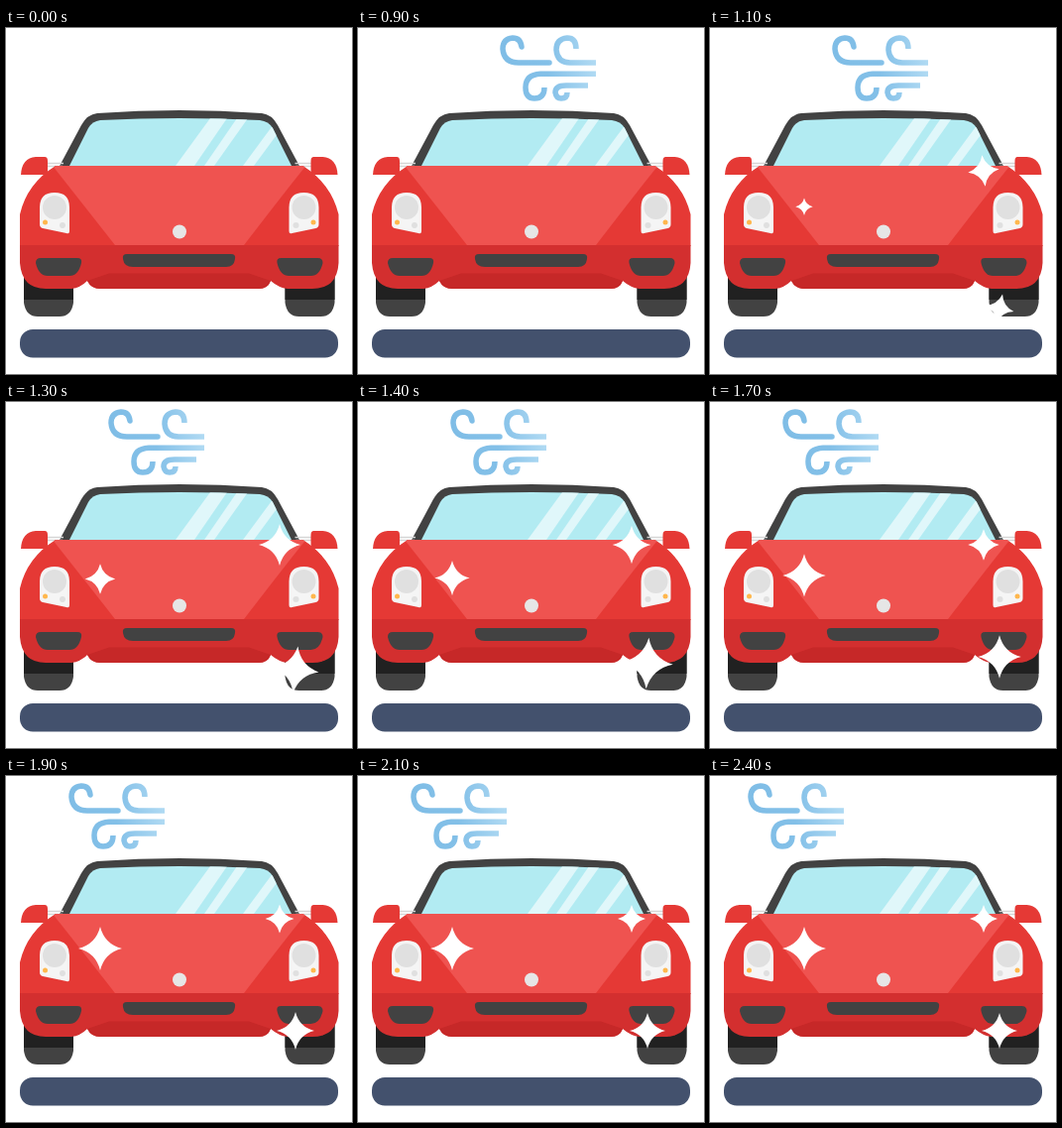
Recreate the animation shown at these times as an HTML page. Size 349x349 px, loop 3.6 s.

```html
<!DOCTYPE html>
<html lang="en">
<head>
<meta charset="utf-8">
<title>Shiny car</title>
<style>
html, body { margin: 0; width: 100%; height: 100%; overflow: hidden; background: #fff; }
svg { display: block; width: 100vw; height: 100vh; }
</style>
</head>
<body>
<svg viewBox="0 0 349 349">
  <defs>
    <linearGradient id="breeze" gradientUnits="userSpaceOnUse" x1="38" y1="0" x2="135" y2="0">
      <stop offset="0" stop-color="#7fbde6"/>
      <stop offset=".5" stop-color="#83c0e8"/>
      <stop offset="1" stop-color="#b0daf3"/>
    </linearGradient>
    <clipPath id="glass">
      <path d="M64 139L83 101Q87 94 95 93Q175 89 256 93Q265 94 269 101L288 139Z"/>
    </clipPath>
    <clipPath id="body">
      <path d="M50 139H299.5Q328 157 335.5 188V237Q334 263 309 263H284Q275 262 267 255Q264 263 255 263H95Q86 263 82 255Q75 262 66 263H40Q16 263 14 237V188Q21 157 50 139Z"/>
    </clipPath>
    <g id="wheel">
      <path d="M18 240H68V277Q66 291 54 291H32Q20 291 18 277Z" fill="#424242"/>
      <path d="M18 240H68V274H18Z" fill="#212121"/>
    </g>
    <g id="mirror">
      <path d="M39 136.5H58M39 139.5H57" stroke="#d5d5d5" stroke-width="1.5"/>
      <path d="M15 148Q16 131 30 130H39Q42 130 42 134V144Q42 148 38 148Z" fill="#e53935"/>
    </g>
    <g id="lamps">
      <path d="M34 181Q34 166 49 166Q64 166 64 181V205Q64 208 61 207L37 202Q34 201 34 198Z" fill="#f5f5f5"/>
      <circle cx="49" cy="181" r="12" fill="#e0e0e0"/>
      <circle cx="39.5" cy="196" r="2.5" fill="#ffb74d"/>
      <circle cx="57" cy="199" r="3" fill="#e0e0e0"/>
      <path d="M35 232H72Q77 232 76 237Q73 250 64 250H42Q33 250 30 237Q30 232 35 232Z" fill="#424242"/>
    </g>
  </defs>

  <rect x="14" y="304" width="321" height="28.5" rx="13" fill="#43516d"/>
  <use href="#wheel"/>
  <use href="#wheel" transform="translate(349.5) scale(-1 1)"/>

  <path d="M53 141L76 98Q82 87 92 86Q175 80 258 86Q268 87 274 98L297 141Z" fill="#424242"/>
  <g clip-path="url(#glass)">
    <path d="M60 88H292V140H60Z" fill="#b2ebf2"/>
    <path d="M171 139H190L223 91H206ZM200 139H210L244 91H233ZM239 139H250L278 101L270 97Z" fill="#e0f7fa"/>
  </g>
  <use href="#mirror"/>
  <use href="#mirror" transform="translate(349.5) scale(-1 1)"/>

  <g clip-path="url(#body)">
    <path d="M14 139H336V220H14Z" fill="#e53935"/>
    <path d="M14 219H336V264H14Z" fill="#d32f2f"/>
    <path d="M82 255L104 247.5H245L267 255V264H82Z" fill="#c62828"/>
    <path d="M47 139H302.5Q287 158 240 219H110Q62 158 47 139Z" fill="#ef5350"/>
  </g>
  <path d="M122 228H227Q232 228 231 233Q230 241 222 241H128Q119 241 118 233Q117 228 122 228Z" fill="#424242"/>
  <circle cx="175" cy="205.5" r="7" fill="#e6e6e6"/>
  <use href="#lamps"/>
  <use href="#lamps" transform="translate(349.5) scale(-1 1)"/>

  <g id="wind" fill="none" stroke="url(#breeze)" stroke-width="5.5">
    <path stroke-linecap="round" d="M60 19Q59 10 51 10Q41 11 41 21Q42 35 57 35H88"/>
    <path d="M115 21Q115 10 106 10Q95 11 95 22Q96 35 109 35H135"/>
    <path d="M135 46.2H79Q64 47 64 60Q64 71 73 71Q83 71 83 60"/>
    <path d="M127 58H105Q94 58 94 65Q95 71 100 71Q106 71 106 65"/>
  </g>
  <g id="stars" fill="#fff"></g>
</svg>
<script>
const LOOP = 3600, STEP = 100, START = 900, SETTLED = 12;
const wind = document.getElementById("wind");
const starGroup = document.getElementById("stars");

// Each star grows until its peak step, then shrinks from size + swell to size.
const stars = [
  { x: 95, y: 174, size: 22, swell: 0, peak: 9, rise: 8, turn: 0 },
  { x: 276, y: 144, size: 14, swell: 7, peak: 4, rise: 0, turn: -12 },
  { x: 292, y: 257, size: 18, swell: 8.5, peak: 6, rise: 39, turn: 18 }
];

for (const star of stars) {
  star.path = document.createElementNS("http://www.w3.org/2000/svg", "path");
  starGroup.append(star.path);
}

const clamp = value => Math.min(1, Math.max(0, value));

function starPath(r) {
  const k = r * 0.2;
  return `M0 ${-r}Q${k} ${-k} ${r} 0Q${k} ${k} 0 ${r}Q${-k} ${k} ${-r} 0Q${-k} ${-k} 0 ${-r}Z`;
}

function drawStar({ path, x, y, size, swell, peak, rise, turn }, step) {
  const left = 1 - clamp(step / peak);
  const settle = 1 - clamp((step - peak) / (SETTLED - peak));
  const radius = (1 - left ** 2) * (size + swell * settle ** 2);
  path.setAttribute("d", starPath(radius));
  path.setAttribute("transform", `translate(${x} ${y + rise * left}) rotate(${turn * left})`);
}

function draw(now) {
  const step = Math.floor((now % LOOP - START) / STEP);
  // The breeze slows to half its speed on the way.
  const offset = Math.max(105 - 10 * step, 75 - 5 * step, 0);
  wind.setAttribute("transform", `translate(${offset})`);
  wind.style.display = step < 0 ? "none" : "";
  stars.forEach(star => drawStar(star, step));
}

function tick() {
  draw(performance.now());
  requestAnimationFrame(tick);
}
tick();
</script>
</body>
</html>
```
